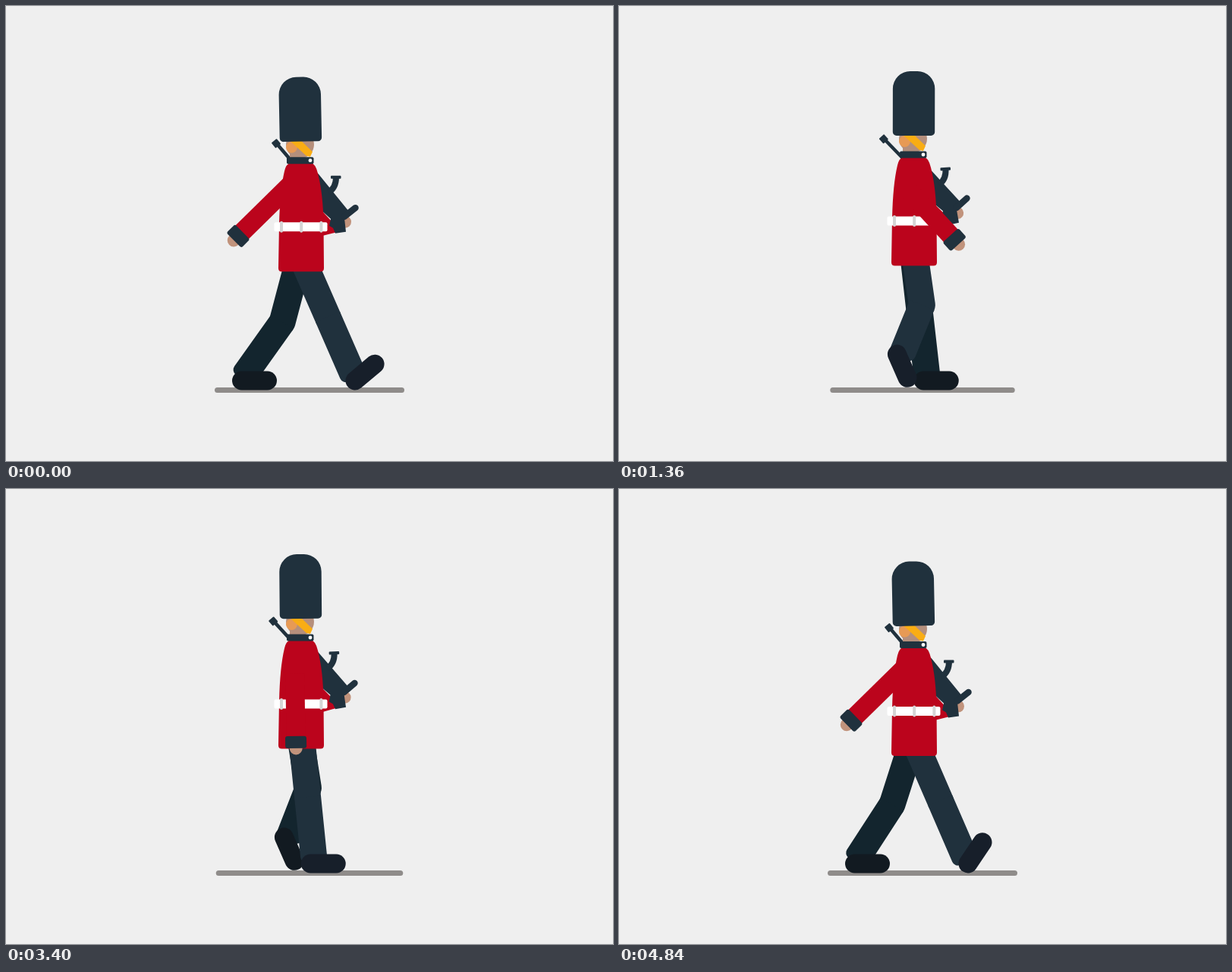
Recreate the animation shown at these times as an HTML page with a canvas. Size 800x600 px, loop 4.88 s.

```html
<!DOCTYPE html>
<html lang="en">
<head>
<meta charset="utf-8">
<title>Marching guard</title>
<style>
  html, body { margin: 0; height: 100%; overflow: hidden; background: #efefef; }
  canvas { display: block; width: 800px; height: 600px; }
</style>
</head>
<body>
<canvas id="stage" width="800" height="600"></canvas>
<script>
const ctx = document.getElementById('stage').getContext('2d');

const C = {
  back: '#efefef', ground: '#8f8c8a', navy: '#20313d', shade: '#13252e',
  boot: '#171f2a', farBoot: '#121a21', red: '#bb041c', skin: '#c1937c',
  face: '#b58f7c', ear: '#e79a55', strap: '#f9ad14', white: '#ffffff', loop: '#d5d5d5'
};

const STEP = 40, LOOP_STEPS = 122, POSES = 120, CYCLE = 20, HALF = CYCLE / 2;
const FLOOR = 494, FRONT = 460, STRIDE = 149.5, FOOT = 34;

const { PI, sin, cos, max, min, floor, hypot } = Math;
const rad = deg => deg * PI / 180;
const lerp = (a, b, k) => a + (b - a) * k;
const clamp = k => max(0, min(1, k));
const smooth = k => k * k * (3 - 2 * k);

function line(x1, y1, x2, y2, width, color) {
  ctx.beginPath();
  ctx.moveTo(x1, y1);
  ctx.lineTo(x2, y2);
  ctx.lineWidth = width;
  ctx.lineCap = 'round';
  ctx.strokeStyle = color;
  ctx.stroke();
}

function box(x, y, w, h, r, color) {
  ctx.beginPath();
  ctx.roundRect(x, y, w, h, r);
  ctx.fillStyle = color;
  ctx.fill();
}

function dot(x, y, r, color) {
  ctx.beginPath();
  ctx.arc(x, y, r, 0, PI * 2);
  ctx.fillStyle = color;
  ctx.fill();
}

function poly(color, ...pts) {
  ctx.beginPath();
  pts.forEach(([x, y]) => ctx.lineTo(x, y));
  ctx.closePath();
  ctx.fillStyle = color;
  ctx.fill();
}

function turned(x, y, angle, draw) {
  ctx.save();
  ctx.translate(x, y);
  ctx.rotate(angle);
  draw();
  ctx.restore();
}

// Heel position and foot angle: half a cycle on the floor, half in the air
function footAt(phase) {
  const p = phase % CYCLE;
  if (p < HALF) {
    const u = clamp(p / (HALF - 1));
    return { x: FRONT - STRIDE * u ** 0.85, y: FLOOR, angle: rad(-40 * max(0, 1 - p / 2)) };
  }
  const u = clamp((p - HALF) / (HALF - 1));
  const angle = rad(56 * sin(1.5 * PI * u) + 12 * sin(PI * u));
  const lift = max(42 * max(0, sin(PI * u)) ** 1.3, FOOT * sin(angle));
  return { x: FRONT - STRIDE * (1 - smooth(u ** 0.8)), y: FLOOR - lift, angle };
}

function drawLeg(phase, hipX, drop, color, bootColor) {
  const heel = footAt(phase);
  const c = cos(heel.angle), s = sin(heel.angle);
  const lean = (heel.x - hipX) / 75, along = 5 - 3.5 * lean * lean;
  const hip = { x: hipX, y: 322 + drop };
  const ankle = { x: heel.x + along * c + 4 * s, y: heel.y + along * s - 4 * c };
  const bend = 20 * max(0, sin(PI * (phase % CYCLE - 7) / HALF));
  const dx = ankle.x - hip.x, dy = ankle.y - hip.y, len = hypot(dx, dy);
  const knee = {
    x: (hip.x + ankle.x) / 2 + bend * dy / len,
    y: (hip.y + ankle.y) / 2 - bend * dx / len
  };
  line(hip.x, hip.y, knee.x, knee.y, 35, color);
  const kx = ankle.x - knee.x, ky = ankle.y - knee.y;
  turned(knee.x, knee.y, Math.atan2(-kx, ky), () =>
    box(-17.5, 0, 35, hypot(kx, ky) + 2, [0, 0, 8, 8], color));
  line(heel.x, heel.y, heel.x + FOOT * c, heel.y + FOOT * s, 25, bootColor);
}

// Far arm, hand and rifle rock together
function drawRifle(swing) {
  ctx.save();
  ctx.translate(382, 288);
  ctx.rotate(rad(-5.5 * swing));
  ctx.translate(-382, -288);
  poly(C.red, [408, 253], [428, 275], [437, 284], [434, 291], [418, 295], [400, 290]);
  dot(447, 277, 8, C.skin);
  line(357, 174, 380, 201, 4.5, C.navy);
  turned(356, 173.5, rad(-39), () => box(-4.5, -4.5, 9, 9, 1, C.navy));
  poly(C.navy, [404, 206], [412, 214], [451, 262], [446, 272], [448, 290], [434, 292],
       [431, 285], [426, 282], [428, 273], [416, 262], [396, 232]);
  line(446, 270, 460.5, 258.5, 8.5, C.navy);
  ctx.beginPath();
  ctx.moveTo(435, 218);
  ctx.quadraticCurveTo(435, 232, 425, 238);
  ctx.lineWidth = 8;
  ctx.lineCap = 'butt';
  ctx.strokeStyle = C.navy;
  ctx.stroke();
  box(428, 216, 13.5, 4, 1, C.navy);
  ctx.restore();
}

function drawHead(swing) {
  dot(387.5, 175, 18.5, C.face);
  box(374, 182, 20, 12, 0, C.face);
  dot(376.5, 178.5, 7.5, C.ear);
  poly(C.strap, [372, 168], [387, 168], [404, 184.5], [401, 191], [396, 190]);
  turned(388.5, 171, rad(lerp(-1.1, 0.7, swing)), () =>
    box(-27.7, -85, 55.4, 85, [23, 23, 5, 5], C.navy));
}

function drawCoat() {
  ctx.beginPath();
  ctx.moveTo(374, 199.5);
  ctx.lineTo(402, 199.5);
  ctx.quadraticCurveTo(408, 200, 411, 213);
  ctx.quadraticCurveTo(418, 240, 418.5, 280);
  ctx.lineTo(419, 338);
  ctx.quadraticCurveTo(419, 342.5, 414.5, 342.5);
  ctx.lineTo(363.5, 342.5);
  ctx.quadraticCurveTo(359, 342.5, 359, 338);
  ctx.lineTo(360, 280);
  ctx.quadraticCurveTo(361, 235, 367, 210);
  ctx.quadraticCurveTo(369, 201, 374, 199.5);
  ctx.fillStyle = C.red;
  ctx.fill();
  box(370, 191.5, 35.5, 9, 2, C.navy);
  dot(401, 196, 2.4, C.white);
  box(353.5, 277.5, 70, 12, 2, C.white);
  for (let i = 0; i < 3; i++) box(361 + 26.2 * i, 276, 4, 15, 2, C.loop);
}

// The shoulder dips and the arm shortens halfway through each swing
function drawArm(swing) {
  const mid = 4 * swing * (1 - swing);
  const x = 383 + 4 * swing - 6 * mid * (1 - swing);
  const y = 220 + 5 * swing + 24 * mid;
  const len = lerp(116, 102, swing) - 14 * mid;
  turned(x, y, rad(-lerp(-45.5, 89, swing)), () => {
    dot(0, len, 8.5, C.skin);
    box(-12.5, 0, 25, len - 8, 0, C.red);
    box(-14, len - 16, 28, 16, 3, C.navy);
  });
}

function draw(phase) {
  // Back to forward and back again, resting briefly at both ends
  const swing = clamp(0.5 - 0.53 * cos((phase + 1.05) / HALF * PI));
  const drop = 4.75 + 5 * cos((phase - 8.5) / HALF * 2 * PI);
  const inset = lerp(278.5, 283.5, swing);

  ctx.fillStyle = C.back;
  ctx.fillRect(0, 0, 800, 600);
  line(inset, 506.5, 800 - inset, 506.5, 7, C.ground);
  drawLeg(phase + HALF, 387, drop, C.shade, C.farBoot);
  drawLeg(phase, 389, drop, C.navy, C.boot);
  ctx.save();
  ctx.translate(0, drop);
  drawRifle(swing);
  drawHead(swing);
  drawCoat();
  drawArm(swing);
  ctx.restore();
}

function tick() {
  const step = floor(performance.now() / STEP) % LOOP_STEPS;
  draw(floor(step * POSES / LOOP_STEPS) % CYCLE);
  requestAnimationFrame(tick);
}
tick();
</script>
</body>
</html>
```
